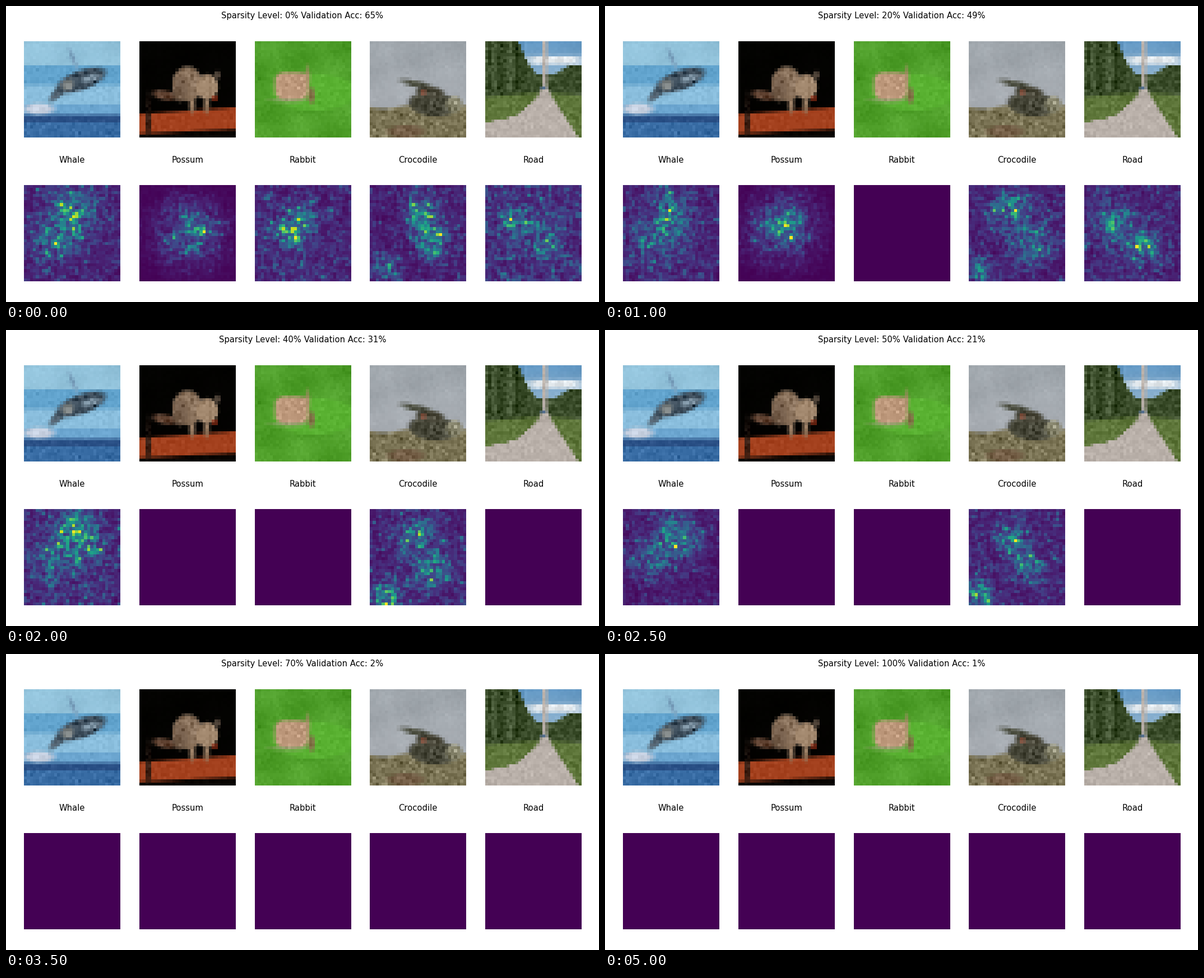
A matplotlib script for the animation above (5500 ms loop, 1058 px wide and 529 px high).

```python
import numpy as np
import matplotlib.pyplot as plt
from matplotlib.animation import FuncAnimation

W, H = 1058, 529
N = 32          # cells per side of every small picture
SIDE = 172      # size of a picture on stage
STEPS = 11

plt.rcParams["font.family"] = "DejaVu Sans"
FONT = 14.7 * 0.72

Y, X = np.mgrid[:N, :N] + 0.5
rng = np.random.default_rng(8)


# ---------- pixel scenes ----------

def canvas(top, bottom, soft=6):
    """Vertical gradient with slow waves and a little grain."""
    t = (Y / N)[..., None]
    waves = np.sin(X / 4 + Y / 7) * np.cos(Y / 3.5 - X / 9)
    img = np.array(top) * (1 - t) + np.array(bottom) * t
    return img + soft * waves[..., None] + rng.normal(0, soft / 3, (N, N, 1))


def blend(img, color, mask, rough=6):
    mask = np.clip(mask, 0, 1)[..., None]
    img += mask * (np.array(color) + rng.normal(0, rough, (N, N, 1)) - img)


def under(img, color, edge, rough=4):
    """Fill everything below a line given as rows."""
    blend(img, color, Y - edge + 0.5, rough)


def ellipse(img, color, cx, cy, rx, ry, tilt=0, rough=8, power=2):
    """Soft-edged ellipse; a higher power makes it boxier."""
    u = (X - cx) * np.cos(tilt) + (Y - cy) * np.sin(tilt)
    v = (Y - cy) * np.cos(tilt) - (X - cx) * np.sin(tilt)
    d = (np.abs(u / rx) ** power + np.abs(v / ry) ** power) ** (1 / power)
    blend(img, color, (1 - d) * min(rx, ry) + 0.5, rough)


def whale():
    img = canvas((146, 195, 219), (155, 200, 225))
    under(img, (98, 164, 206), 8)
    under(img, (138, 190, 221), 14.5)
    under(img, (108, 166, 208), 21)
    under(img, (42, 80, 134), 24.5)
    under(img, (56, 108, 164), 27, 7)
    ellipse(img, (196, 206, 222), 5, 22.5, 5, 1.8)
    ellipse(img, (122, 158, 188), 16.4, 6, 0.6, 3, -0.4)
    ellipse(img, (82, 98, 112), 11.5, 17, 4, 1.4, -0.8, 14)
    ellipse(img, (60, 76, 90), 19, 13, 8.5, 3.2, -0.35, 16)
    ellipse(img, (140, 146, 146), 14.5, 14.5, 2, 1.8, -0.6, 20)
    ellipse(img, (124, 146, 162), 22, 12.3, 3, 1.1, -0.3, 12)
    return img


def possum():
    img = canvas((3, 3, 1), (3, 2, 1), 1)
    under(img, (164, 65, 30), 24.2 - X * 0.07)
    under(img, (8, 5, 2), 30.8 - X * 0.05, 2)
    ellipse(img, (26, 16, 10), 3, 25, 0.8, 6, power=8)
    ellipse(img, (92, 62, 45), 8.5, 18, 4, 1.6, 0.2, 14)
    ellipse(img, (140, 116, 94), 16, 14.2, 5, 5.8, 0, 12)
    ellipse(img, (116, 93, 74), 13.5, 16, 2.3, 4, 0, 10)
    ellipse(img, (162, 136, 110), 22.5, 15.2, 3.6, 4.2, 0, 10)
    for x in (17.5, 22.3):
        ellipse(img, (152, 124, 98), x, 21.3, 0.9, 2.4)
    ellipse(img, (104, 88, 74), 26, 11.2, 0.8, 1.2)
    ellipse(img, (185, 66, 36), 25, 19, 0.7, 0.8)
    return img


def rabbit():
    img = canvas((78, 158, 42), (80, 160, 42), 10)
    ellipse(img, (90, 178, 50), 20, 17, 14, 6, 0, 4)
    ellipse(img, (146, 160, 112), 11.5, 19.6, 5, 0.7)
    ellipse(img, (128, 112, 70), 18.8, 18, 1.2, 2.6)
    ellipse(img, (190, 153, 124), 12.3, 14.8, 5.6, 4.5, power=4)
    ellipse(img, (170, 144, 106), 17.5, 12, 0.7, 3)
    return img


def crocodile():
    img = canvas((158, 165, 171), (172, 176, 182))
    under(img, (122, 115, 84), 21.8 + np.sin(X / 3) * 0.6, 15)
    ellipse(img, (114, 92, 68), 12, 30, 6, 2, 0, 14)
    ellipse(img, (68, 68, 54), 21, 21, 8, 4, 0.1, 16)
    ellipse(img, (74, 76, 62), 15.5, 14.2, 4.8, 1, 0.2, 14)
    ellipse(img, (68, 66, 52), 20, 17, 4.5, 2, 0.1, 16)
    ellipse(img, (136, 134, 110), 28, 21, 2.6, 2.8, 0, 16)
    ellipse(img, (144, 82, 62), 17.8, 17, 0.8, 0.8)
    return img


def road():
    img = canvas((100, 154, 198), (210, 215, 218))
    ellipse(img, (224, 230, 234), 23, 6.3, 9, 1.4, power=8)
    under(img, (58, 76, 42), np.interp(X, [11, 14, 17, 23, 28], [0, 7, 11, 11, 8]), 12)
    stripes = rng.normal(0, 14, N)[None, :, None]
    img += stripes * ((X < 14) & (Y < 16))[..., None]
    under(img, (94, 118, 58), 17 + np.abs(X - 19) * 0.08, 8)
    left = np.interp(Y, [15, 19, 25, 27], [19, 17, 10, 0])
    right = np.interp(Y, [15, 19, 32], [20.5, 22.5, 31])
    blend(img, (186, 177, 170), np.minimum(X - left, right - X) + 0.5, 6)
    ellipse(img, (66, 98, 136), 19.3, 15.4, 0.8, 0.5)
    return img


# ---------- attention maps ----------

def heat(base, spots):
    """Clumped speckle under gaussian spots (x, y, radius), scaled to a peak of 1."""
    level = np.full((N, N), base)
    for x, y, r in spots:
        x, y = rng.normal((x, y), 0.8)
        level += rng.uniform(0.2, 0.5) * np.exp(-((X - x) ** 2 + (Y - y) ** 2) / (2 * r * r))
    speckle = rng.gamma(2.2, 1 / 2.2, (N, N))
    near = sum(np.roll(speckle, s, a) for s in (-1, 1) for a in (0, 1)) / 4
    out = level * (0.65 * speckle + 0.35 * near)
    return out / out.max()


# name, scene, base level, spots, steps until the map goes blank
SUBJECTS = [
    ("Whale", whale, 0.16, [(17, 6, 4), (18, 12, 5), (10, 17, 5)], 7),
    ("Possum", possum, 0.01, [(16, 14, 7), (16, 13.5, 2)], 3),
    ("Rabbit", rabbit, 0.12, [(17, 10, 3), (12, 16, 3.5)], 1),
    ("Crocodile", crocodile, 0.13, [(16, 9, 4), (21, 20, 4), (5, 28, 3)], 7),
    ("Road", road, 0.13, [(20, 20, 3), (10, 12, 4)], 3),
]
EMPTY = np.zeros((N, N))


# ---------- stage ----------

fig = plt.figure(figsize=(W / 100, H / 100), dpi=100, facecolor="white")


def panel(x, y, data, **kw):
    inset = 0.02    # keeps the image from growing by a rounded-up pixel
    size = SIDE - 2 * inset
    ax = fig.add_axes([(x + inset) / W, 1 - (y + SIDE - inset) / H, size / W, size / H])
    ax.axis("off")
    return ax.imshow(data, interpolation="nearest", aspect="auto", **kw)


def label(x, baseline, text):
    return fig.text(x / W, 1 - baseline / H, text, fontsize=FONT, color="black",
                    ha="center", va="baseline")


title = label(W / 2, 22, "")
maps, series = [], []
for i, (name, scene, base, spots, life) in enumerate(SUBJECTS):
    x = 32 + 205.75 * i
    left = round(x)
    panel(left, 63, np.clip(scene(), 0, 255).astype(np.uint8))
    label(x + SIDE / 2, 280, name)
    maps.append(panel(left, 320, EMPTY, cmap="viridis", vmin=0, vmax=1))
    series.append([heat(base, spots) for _ in range(life)])


def accuracy(step):
    return max(1, round(65 - 7.9 * step - 0.165 * step ** 2))


def update(step):
    title.set_text(f"Sparsity Level: {10 * step}% Validation Acc: {accuracy(step)}%")
    for image, steps in zip(maps, series):
        image.set_data(steps[step] if step < len(steps) else EMPTY)
    return [title, *maps]


anim = FuncAnimation(fig, update, frames=STEPS, interval=500, repeat=True, repeat_delay=0)
plt.show()
```
